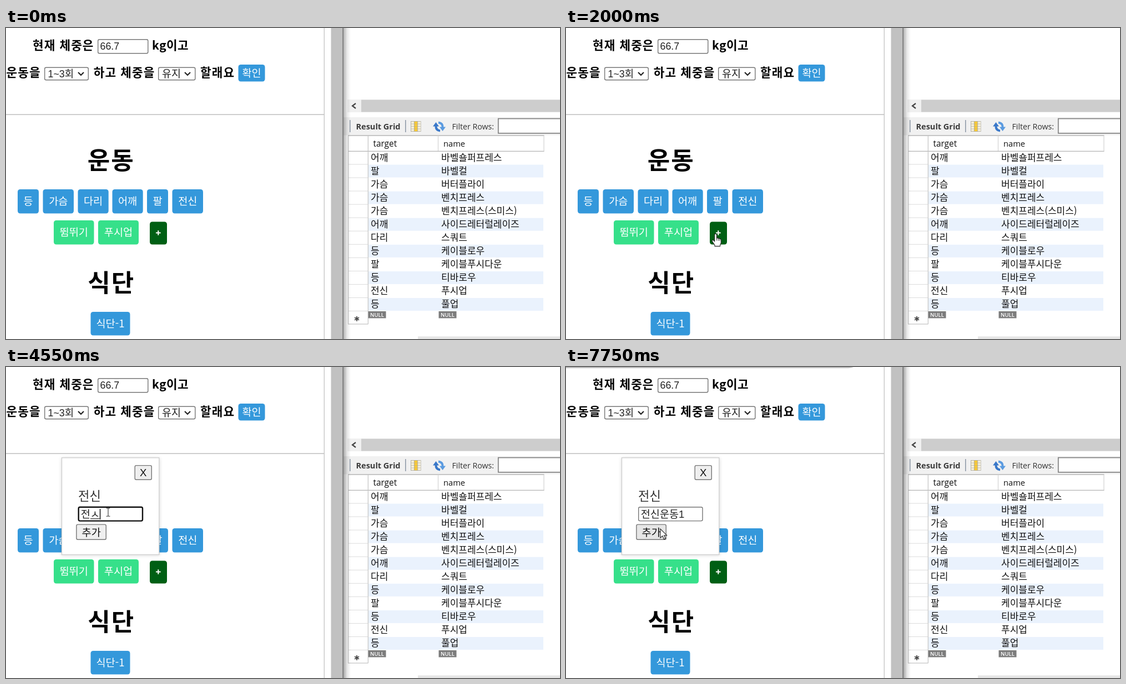
An HTML page that plays this animation: 998x561 px, repeating every 8 s.

```html
<!DOCTYPE html>
<html lang="ko">
<head>
<meta charset="utf-8">
<title>운동 추가</title>
<style>
html, body { margin: 0; width: 100%; height: 100%; overflow: hidden; background: #fff; }
svg { display: block; width: 998px; height: 561px; }
text { font-family: "Noto Sans CJK KR", "Noto Sans CJK", sans-serif; white-space: pre; }
.field { font-family: "Liberation Sans", "Noto Sans CJK KR", "Noto Sans CJK", sans-serif; }
.tool { font-family: "Open Sans", "Noto Sans", sans-serif; }
</style>
</head>
<body>
<svg id="stage" viewBox="0 0 998 561" xmlns="http://www.w3.org/2000/svg">
  <defs>
    <linearGradient id="edge"><stop offset="0" stop-color="#000" stop-opacity=".34"/><stop offset=".5" stop-color="#000" stop-opacity=".1"/><stop offset="1" stop-color="#000" stop-opacity="0"/></linearGradient>
    <linearGradient id="drop" x2="0" y2="1"><stop offset="0" stop-color="#a6a6a6"/><stop offset="1" stop-color="#e8e8e8"/></linearGradient>
    <filter id="soft" x="-20%" y="-20%" width="140%" height="140%"><feGaussianBlur stdDeviation="3"/></filter>
  </defs>
</svg>
<script>
const LOOP = 8000, STEP = 50;
const BLUE = '#3498db', GREEN = '#36e08a', DARK = '#005f14', GREY = '#767676';
const svg = document.getElementById('stage');

function add(tag, attrs, parent = svg) {
  const el = document.createElementNS('http://www.w3.org/2000/svg', tag);
  for (const k in attrs) el.setAttribute(k, attrs[k]);
  return parent.appendChild(el);
}
function rect(x, y, x2, y2, fill, more, parent) {
  return add('rect', { x, y, width: x2 - x, height: y2 - y, fill, ...more }, parent);
}
function path(d, stroke, width, more, parent) {
  return add('path', { d, fill: 'none', stroke, 'stroke-width': width, ...more }, parent);
}
// mid is the vertical centre of the glyphs
function label(x, mid, str, size, more, parent) {
  const el = add('text', { x, y: mid + size * 0.37, 'font-size': size, ...more }, parent);
  el.textContent = str;
  return el;
}
function button(x, y, x2, y2, str, fill) {
  rect(x, y, x2, y2, fill, { rx: 4.5 });
  label((x + x2) / 2, (y + y2) / 2 - 0.3, str, 18.6, { fill: '#fff', 'text-anchor': 'middle' });
}
function frame(x, y, x2, y2, fill, parent) {
  return rect(x + 0.7, y + 0.7, x2 - 0.7, y2 - 0.7, fill, { rx: 2.5, stroke: GREY, 'stroke-width': 1.4 }, parent);
}
function show(el, on) { el.setAttribute('display', on ? 'inline' : 'none'); }

function drawPage() {
  const bold = { 'font-weight': 700, 'letter-spacing': 1.1 };
  const field = { class: 'field', fill: '#222' };
  label(48, 31, '현재 체중은', 21.3, bold);
  frame(165, 20, 256.5, 46.5, '#fff');
  label(169.5, 33, '66.7', 17.8, { ...field, y: 39 });
  label(263, 31, 'kg이고', 21.3, { ...bold, 'letter-spacing': 0.4 });

  label(0.6, 80.5, '운동을', 21.3, bold);
  frame(69, 70.5, 149, 94.5, '#fff');
  label(75.5, 82, '1~3회', 17.8, field);
  label(157.8, 80.5, '하고 체중을', 21.3, bold);
  frame(274, 70.5, 341.5, 94.5, '#fff');
  label(281, 82, '유지', 18.4, field);
  for (const x of [130, 322]) path(`M${x} 80l5 5l5-5`, '#222', 2.2);
  label(350, 80.5, '할래요', 21.3, bold);
  button(418.5, 66, 466.5, 96.5, '확인', BLUE);

  rect(0, 155.3, 573, 157, '#c6c6c6');
  rect(572.6, 0, 574, 561, '#c8c8c8');

  const head = { 'font-weight': 700, 'letter-spacing': 2, 'text-anchor': 'middle' };
  label(189.2, 239, '운동', 44, head);
  label(189.7, 459.5, '식단', 44, head);

  const parts = [['등', 21, 59], ['가슴', 66.5, 122], ['다리', 129.5, 184.7], ['어깨', 191.5, 246.7], ['팔', 254, 292], ['전신', 299.5, 355]];
  for (const [s, a, b] of parts) button(a, 291, b, 334.5, s, BLUE);
  button(86, 347, 158.5, 390.5, '뜀뛰기', GREEN);
  button(166, 347, 239, 390.5, '푸시업', GREEN);
  rect(259, 349.5, 290, 390.5, DARK, { rx: 4.5 });
  path('M270 369.5h8.6M274.3 365.2v8.6', '#fff', 2);
  button(152.5, 512, 223.5, 554.5, '식단-1', BLUE);
}

function drawTable() {
  rect(615, 129, 998, 152, '#f0f0f0');
  rect(640, 129.5, 998, 151.5, '#cdcdcd');
  path('M630 136l-6 4.5l6 4.5', '#444', 2.2);
  rect(608, 161, 998, 193.5, '#f1f1f1');
  rect(619, 166, 620.5, 188, '#8b96a5');
  label(630.5, 178, 'Result Grid', 14.5, { class: 'tool', 'font-weight': 700, fill: '#3c3c3c', y: 183.3 });
  rect(719, 166, 720.5, 188, '#8b96a5');

  rect(729, 168, 747.5, 187, '#a9a69b');
  for (let c = 0; c < 3; c++)
    for (let r = 0; r < 4; r++)
      rect(729.8 + c * 6, 168.8 + r * 4.5, 735 + c * 6, 172.7 + r * 4.5, c === 1 ? '#ffcc33' : '#f4efdc');
  path('M782 185.5q-8-1-7.5-9', '#3a78c9', 4);
  path('M779 170.5q8 1 7.5 9', '#5b9be0', 4);
  add('path', { d: 'M769 177.5h11l-5.5-7.5z', fill: '#3a78c9' });
  add('path', { d: 'M781 178.5h11l-5.5 7.5z', fill: '#5b9be0' });

  label(803.5, 178, 'Filter Rows:', 14.2, { class: 'tool', fill: '#333', y: 183.3 });
  rect(886.8, 163.5, 1003, 189.8, '#fff', { stroke: '#808080', 'stroke-width': 1.7 });

  rect(616, 193.5, 969.5, 222.5, '#fff');
  path('M616 194H969.5M616 222.3H969.5', '#b4b4b4', 1.3);
  path('M616.5 194V534M652.3 194V534', '#c2c2c2', 1.2);
  path('M778.5 194V222M969 194V222', '#d2d2d2', 1.2);
  label(661.5, 209, 'target', 15.4, { class: 'tool', fill: '#111', y: 214 });
  label(788, 209, 'name', 14.7, { class: 'tool', fill: '#111', y: 214 });

  const rows = ['어깨 바벨숄퍼프레스', '팔 바벨컬', '가슴 버터플라이', '가슴 벤치프레스', '가슴 벤치프레스(스미스)',
    '어깨 사이드레터럴레이즈', '다리 스쿼트', '등 케이블로우', '팔 케이블푸시다운', '등 티바로우', '전신 푸시업', '등 풀업'];
  rows.forEach((row, i) => {
    const [target, name] = row.split(' '), mid = 233.5 + i * 24.05;
    if (i % 2) rect(653, mid - 11, 968, mid + 12, '#eaf2fd');
    rect(617, mid + 12, 652, mid + 13, '#dcdcdc');
    label(657, mid, target, 17, { fill: '#111' });
    label(784, mid, name, 17, { fill: '#111' });
  });
  rect(616, 533.5, 652.5, 534.7, '#c2c2c2');
  for (const x of [652.5, 779.5]) {
    rect(x, 511, x + 32, 523.5, '#7c7c7c');
    label(x + 16, 517, 'NULL', 9.5, { class: 'tool', fill: '#fff', 'font-weight': 600, 'text-anchor': 'middle', y: 520.6 });
  }
  path('M632 520v9M628 522.3l8 4.5M636 522.3l-8 4.5', '#444', 1.8);
  rect(742, 556.3, 998, 561, '#e6e6e6');
}

function drawPopup() {
  const g = add('g', {});
  rect(100, 164, 277, 340, '#000', { opacity: 0.14, filter: 'url(#soft)' }, g);
  rect(100.5, 163.7, 275.8, 338.5, '#fff', { stroke: '#cdcdcd', 'stroke-width': 1.3 }, g);
  const top = add('g', {}, g);
  frame(231.5, 176, 263, 203, '#efefef', top);
  label(247.2, 189, 'X', 18.6, { class: 'field', 'text-anchor': 'middle', fill: '#111', y: 195.8 }, top);
  label(130, 231.5, '전신', 22.2, { fill: '#333', 'font-weight': 350 }, top);
  const input = frame(130, 252, 246.7, 278.3, '#fff', g);
  const text = label(134.7, 265, '', 18.6, { class: 'field', fill: '#222' }, g);
  const line = rect(0, 273, 16.5, 274.2, '#333', {}, g);
  const caret = rect(0, 256, 1.5, 275, '#111', {}, g);
  const face = frame(126.2, 284, 181, 312.5, '#efefef', g);
  label(153.7, 298.3, '추가', 18.6, { class: 'field', 'text-anchor': 'middle', fill: '#111' }, g);
  return { g, top, input, text, line, caret, face };
}

function drawPointers() {
  const arrow = add('g', {}), hand = add('g', {}), beam = add('g', {});
  path('M0 0V16.2L3.8 12.7L6.5 18.8L9.2 17.6L6.6 11.7H11.6Z', '#222', 1.1, { fill: '#fff' }, arrow);
  path('M-1.8 1.4Q0-1 1.9 1.4V8.2Q4 6.8 4.8 8.8Q6.6 7.7 7.4 9.6Q9.6 8.8 9.8 11.5V16Q9.6 18.5 8.2 20V22.6H-1.6V20.4Q-3.8 18-6.2 13.6Q-6.6 11-4.2 11.6L-1.8 14Z',
    '#222', 1.1, { fill: '#fff', 'stroke-linejoin': 'round' }, hand);
  path('M1.9 8.2V12.5M4.8 8.8V12.8M7.4 9.6V13', '#222', 0.9, {}, hand);
  path('M-3.5-7.3H-1L0-6.5L1-7.3H3.5M-3.5 7.3H-1L0 6.5L1 7.3H3.5M0-6.5V6.5', '#333', 1.1, {}, beam);
  return { arrow, hand, beam };
}

drawPage();
drawTable();
rect(585.5, 0, 607, 561, '#c1c1c1');
const shade = rect(608, 0, 621, 561, 'url(#edge)');
rect(606.2, 0, 608, 561, '#7d7d7d');
const pop = drawPopup();
const alertEdge = add('path', { d: 'M0 0H518Q512 2.6 504 2.6H0Z', fill: 'url(#drop)' });
const pointers = drawPointers();

// time, x, y
const track = [
  [800, 986, 526], [1000, 779, 515], [1200, 520, 482], [1400, 300, 441], [1600, 209, 419],
  [1700, 222, 404], [1850, 260, 379], [1950, 269.5, 371], [2400, 269.5, 371], [2450, 260, 357],
  [2550, 219, 297], [2600, 198, 272], [2750, 184, 262], [6850, 184, 262], [6950, 182, 268],
  [7050, 177, 281], [7200, 172, 289], [7350, 170, 292]
];
const typed = [
  [4050, 'ㅈ'], [4150, '저'], [4200, '전'], [4550, '전ㅅ'], [4700, '전시'], [4850, '전신'],
  [5050, '전신ㅇ'], [5150, '전신우'], [5200, '전신운'], [5400, '전신운ㄷ'], [5600, '전신운도'],
  [5700, '전신운동'], [6400, '전신운동1']
];
const caretOn = [[2900, 3400], [3550, 6250], [6400, 6900]];

function pointerAt(t) {
  const n = track.findIndex(k => k[0] > t);
  if (n < 0) return track[track.length - 1].slice(1);
  const [t0, x0, y0] = track[n - 1], [t1, x1, y1] = track[n];
  const u = (t - t0) / (t1 - t0);
  return [x0 + (x1 - x0) * u, y0 + (y1 - y0) * u];
}
function pointerKind(x, y, open) {
  const inside = (a, b, c, d) => x >= a && x <= c && y >= b && y <= d;
  if (open && inside(130, 252, 247, 278)) return 'beam';
  if (inside(166, 347, 239, 390) || inside(259, 350, 290, 390)) return 'hand';
  return 'arrow';
}

function render(t) {
  const open = t >= 2100, focus = t >= 2900 && t < 7300, settled = t >= 2900;
  shade.setAttribute('opacity', open ? 1 : 0.85);
  show(pop.g, open);
  pop.top.setAttribute('transform', `translate(0 ${settled ? 0.9 : 0})`);
  pop.face.setAttribute('transform', `translate(0 ${settled ? -0.6 : 0})`);
  pop.input.setAttribute('stroke', focus ? '#101010' : GREY);
  pop.input.setAttribute('stroke-width', focus ? 2.4 : 1.4);
  pop.face.setAttribute('fill', t >= 7100 ? '#e6e6e6' : '#efefef');

  const entry = typed.filter(k => k[0] <= t).pop();
  const str = entry ? entry[1] : '';
  if (pop.text.textContent !== str) pop.text.textContent = str;
  const wide = str.replace('1', '').length;
  const end = 134.5 + wide * 17.15 + (str.length - wide) * 10;
  pop.caret.setAttribute('x', end);
  show(pop.caret, caretOn.some(([a, b]) => t >= a && t < b));
  pop.line.setAttribute('x', end - 16.8);
  show(pop.line, str && wide === str.length);

  show(alertEdge, t >= 7700);
  alertEdge.setAttribute('opacity', t >= 7750 ? 1 : 0.5);

  const seen = t >= 800;
  const [x, y] = seen ? pointerAt(t) : [0, 0];
  const kind = pointerKind(x, y, open);
  for (const k in pointers) show(pointers[k], seen && k === kind);
  pointers[kind].setAttribute('transform', `translate(${x} ${y})`);
}

function tick() {
  const t = performance.now() % LOOP;
  render(Math.floor(t / STEP) * STEP);
  requestAnimationFrame(tick);
}
tick();
</script>
</body>
</html>
```
